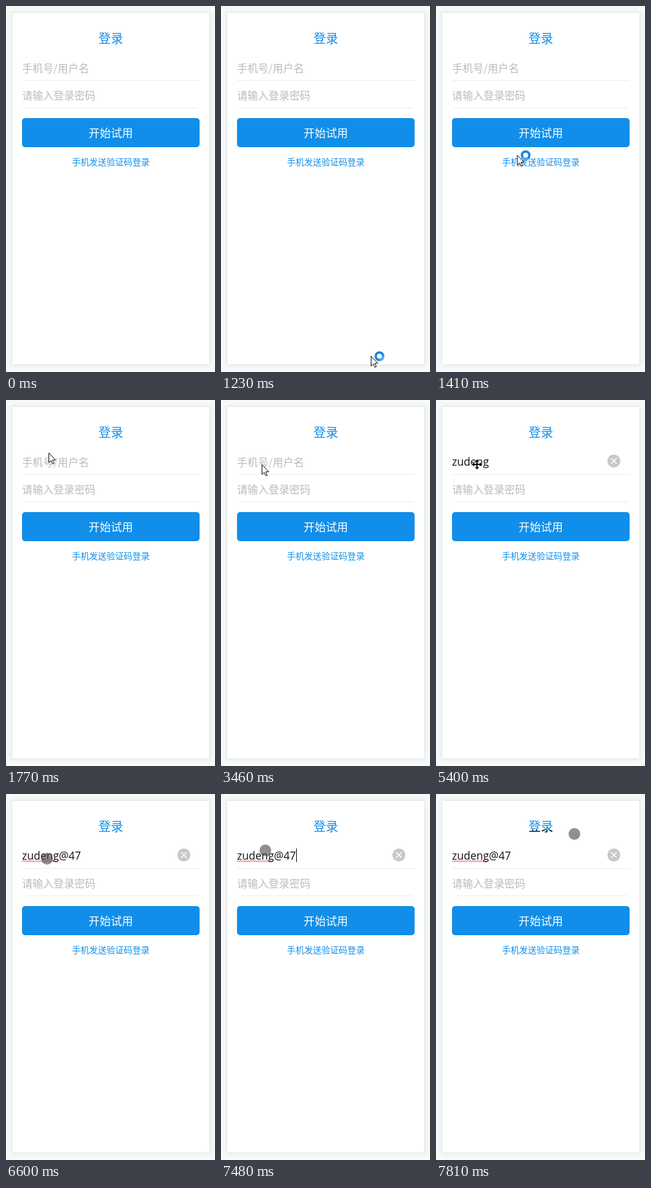
An HTML page for the animation above (8 s loop, 339 by 591 pixels).

```html
<!DOCTYPE html>
<html lang="zh-CN">
<head>
<meta charset="utf-8">
<title>登录</title>
<style>
  html, body { margin: 0; width: 100%; height: 100%; overflow: hidden; background: #f8f9f9; }
  svg { display: block; width: 100%; height: 100%; font-family: "Noto Sans CJK SC", "Noto Sans CJK", sans-serif; }
  .card { fill: #fff; stroke: #e2e6e6; filter: drop-shadow(0 0 5px rgba(0, 0, 0, .07)); }
  .blue { fill: #108ee9; }
  .middle { text-anchor: middle; }
  .title { font-size: 20px; }
  .field { font-size: 17px; fill: #bbb; }
  .rule { fill: #ebebeb; }
  .button { font-size: 18px; fill: #fff; }
  .link { font-size: 14px; }
  #typed { font: 17.5px "Open Sans", "Noto Sans", sans-serif; fill: #111; white-space: pre; }
  #squiggle { fill: none; stroke: #f00; stroke-width: .9; }
  #residue { fill: #111; clip-path: url(#lowerTitle); }
</style>
</head>
<body>
<svg viewBox="0 0 339 591">
  <defs><clipPath id="lowerTitle"><rect x="145" y="57.5" width="50" height="8"/></clipPath></defs>
  <rect class="card" x="9.5" y="10.5" width="321" height="569" rx="1"/>

  <text class="title blue middle" x="170" y="59.5">登录</text>
  <text id="residue" class="title middle" x="170" y="59.5">登录</text>

  <text id="placeholder" class="field" x="26" y="106.5">手机号/用户名</text>
  <text id="typed" x="26" y="106"></text>
  <path id="squiggle"/>
  <rect id="caret" y="88" width="1" height="22"/>
  <g id="clear" transform="translate(288.5 98.5)">
    <circle r="10.5" fill="#c8c8c8"/>
    <path d="M-4.5-4.5l9 9m0-9l-9 9" stroke="#fff" stroke-width="1.6"/>
  </g>
  <rect class="rule" x="26" y="120" width="288" height="1"/>

  <text class="field" x="26" y="150.5">请输入登录密码</text>
  <rect class="rule" x="29" y="164" width="282" height="1"/>

  <rect class="blue" x="26" y="181" width="288" height="47" rx="5"/>
  <text class="button middle" x="170" y="212">开始试用</text>
  <text class="link blue middle" x="170" y="257.3">手机发送验证码登录</text>

  <g id="arrow">
    <path d="M.5.5V16.2L4 12.8L6.6 18.4L9 17.4L6.4 11.9H11.5Z" fill="#fff" stroke="#000"/>
    <g id="busy" transform="translate(14 .5)">
      <circle r="6" fill="#fff" stroke="#1b86e3" stroke-width="4"/>
      <path id="glint" d="M0-6A6 6 0 0 1 6 0" fill="none" stroke="#55aef5" stroke-width="3"/>
    </g>
  </g>
  <path id="move" transform="translate(66.5 104)" stroke="#fff" stroke-width="1" paint-order="stroke"
    d="M0-8L3.5-4.5H1V-1H4.5V-3.5L8 0L4.5 3.5V1H1V4.5H3.5L0 8L-3.5 4.5H-1V1H-4.5V3.5L-8 0L-4.5-3.5V-1H-1V-4.5H-3.5Z"/>
  <circle id="touch" r="9.5" fill="rgba(70,70,70,.6)"/>
</svg>
<script>
  const LOOP = 8000;
  const LEFT = 26;
  const NAME = "zudeng@47";
  const WORD_LENGTH = 6;
  const KEY_TIMES = [3770, 4000, 4150, 4330, 4740, 4890, 5660, 5910, 6140];
  const CARET_SPANS = [[2000, 2480], [2980, 3460], [3770, 5400], [5660, 6600], [7110, 7600]];

  const el = id => document.getElementById(id);
  const show = (id, on) => { el(id).style.display = on ? "" : "none"; };
  const place = (id, x, y) => el(id).setAttribute("transform", `translate(${x} ${y})`);
  const mix = (a, b, k) => a + (b - a) * k;
  const easeOut = (k, power) => 1 - (1 - k) ** power;
  const smooth = k => k * k * (3 - 2 * k);

  // Progress from 0 to 1, held between evenly spaced updates.
  function stepped(t, from, to, count) {
    const k = Math.min(1, Math.max(0, (t - from) / (to - from)));
    return Math.floor(k * count + 1e-6) / count;
  }

  function arrowPosition(t) {
    if (t < 1920) {
      const k = stepped(t, 1230, 1770, 12);
      return [mix(243, 69, easeOut(k, 2.53)), mix(565, 85, easeOut(k, 2.78))];
    }
    const down = stepped(t, 1920, 2150, 3);
    const settle = stepped(t, 2430, 2480, 1);
    return [69 - 2 * down - settle, 85 + 17 * down + 2 * settle].map(Math.round);
  }

  function drawSquiggle() {
    const typed = el("typed");
    typed.textContent = NAME;
    const end = LEFT + typed.getSubStringLength(0, WORD_LENGTH);
    let d = `M${LEFT} 109.5`;
    for (let x = LEFT + 2, i = 0; x <= end; x += 2, i++) d += `L${x} ${i % 2 ? 109.5 : 107.5}`;
    el("squiggle").setAttribute("d", d);
  }

  function render(t) {
    const count = KEY_TIMES.filter(time => time <= t).length;
    const typed = el("typed");
    typed.textContent = NAME.slice(0, count);
    show("placeholder", !count);
    show("clear", count);
    show("squiggle", t >= 5760);

    show("caret", CARET_SPANS.some(([on, off]) => t >= on && t < off));
    const width = count ? typed.getComputedTextLength() : 0;
    el("caret").setAttribute("x", Math.round(LEFT + width));

    show("arrow", t >= 1230 && t < 5400);
    place("arrow", ...arrowPosition(t));
    show("busy", t < 1600);
    el("glint").setAttribute("transform", `rotate(${t * .36})`);
    show("move", t >= 5400 && t < 5940);

    const k = stepped(t, 7390, 7810, 9);
    show("touch", t >= 5940);
    place("touch", mix(66.5, 224.5, smooth(k)), mix(104.5, 64.5, easeOut(k, 3.5)));
    show("residue", t >= 7600);
  }

  const start = performance.now();
  function tick() {
    render((performance.now() - start) % LOOP);
    requestAnimationFrame(tick);
  }
  drawSquiggle();
  tick();
</script>
</body>
</html>
```
